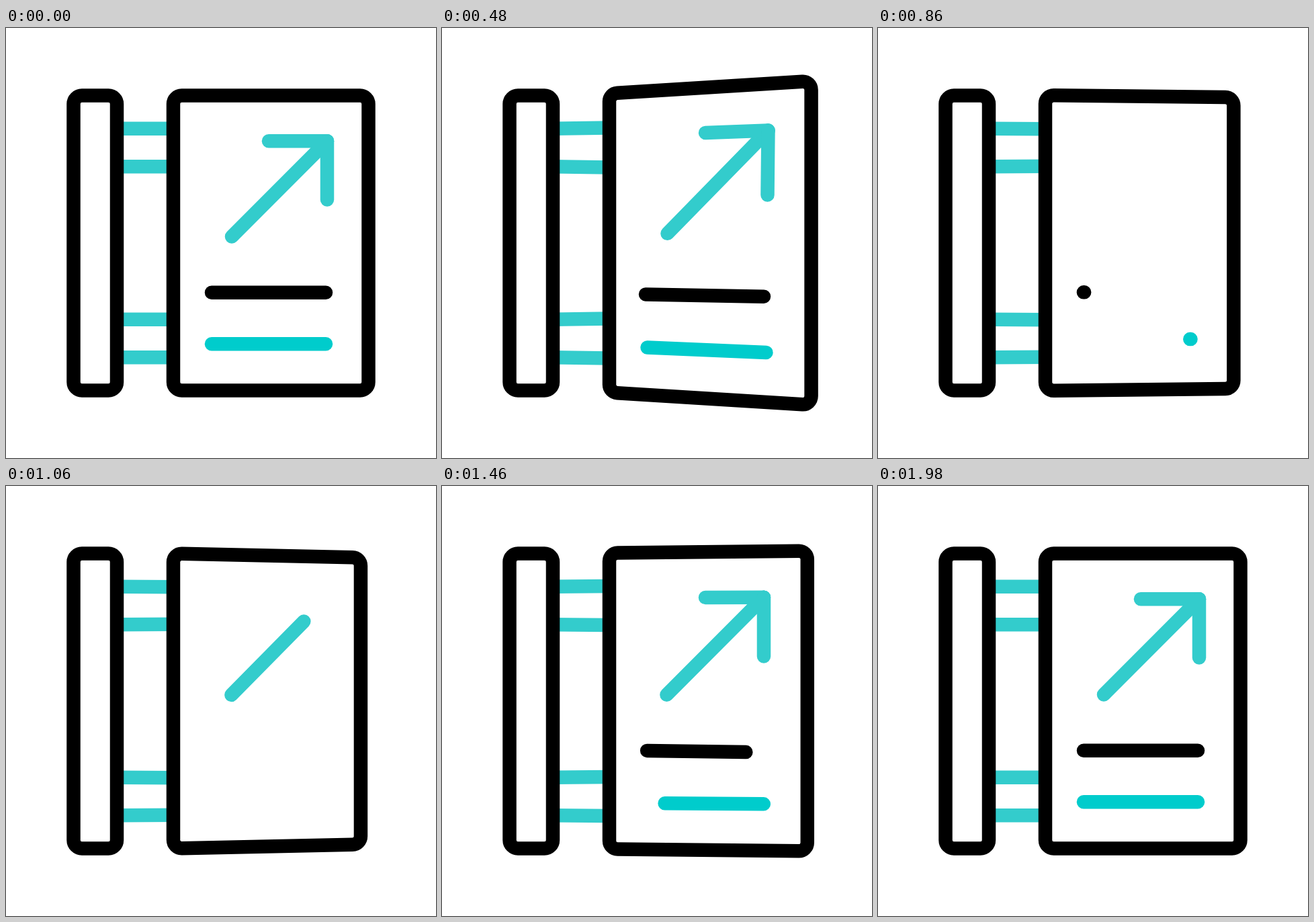
Write an HTML page with a canvas that moves like this. It is 640 px wide and 640 px high and loops after 2580 ms.

```html
<!DOCTYPE html>
<html lang="en">
<head>
<meta charset="utf-8">
<title>Swinging sign</title>
<style>
html, body { margin: 0; width: 100%; height: 100%; overflow: hidden; background: #fff; }
canvas { display: block; width: 100vmin; height: 100vmin; }
</style>
</head>
<body>
<canvas id="stage" width="640" height="640"></canvas>
<script>
const ctx = document.getElementById('stage').getContext('2d');
const LOOP = 2580, STEP = 20;
const BLACK = '#000', TEAL = '#33cccc', CYAN = '#00cccc';

// board: right x, left top y, right top y; skew: tilt of the bars
// arrow: tail, tip, left barb, lower barb; upper and lower: ends of the text lines
const rest = {
  board: [539.5, 100.5, 100.5], skew: [0],
  arrow: [336, 310.5, 478, 168.2, 391, 168.2, 478, 255.5],
  upper: [306, 393.7, 476, 393.7], lower: [306, 470.3, 476, 470.3]
};
const poses = [
  rest,
  { board: [549.6, 97.5, 78.8], skew: [1.2],
    arrow: [335.5, 305.8, 485.5, 152.5, 392, 156, 484.5, 248.5],
    upper: [303, 396.5, 479, 399.7], lower: [305.5, 475.5, 482.5, 483] },
  { board: [525.2, 100.7, 108.2], skew: [-0.7],
    arrow: [335.5, 311, 470, 174.5, 388, 175, 470, 262],
    upper: [306.5, 392.7, 470, 390], lower: [306, 464, 462, 459] },
  { board: [549, 99.3, 93.3], skew: [1.2],
    arrow: [334.5, 310.5, 481.3, 162.5, 393, 162.8, 481.3, 251],
    upper: [305, 394.2, 480, 398], lower: [306, 474, 482, 477] },
  { board: [535.5, 100.1, 101.6], skew: [0],
    arrow: [334.3, 311, 475.3, 171, 390.3, 171, 475.3, 257.3],
    upper: [305.3, 393.5, 473.7, 394], lower: [307, 469, 473.7, 467.5] },
  rest
];
const keys = [0, 495, 990, 1320, 1650, 1980];

const mix = (a, b, u) => a + (b - a) * u;
function ease(t, start, end) {
  const u = Math.min(1, Math.max(0, (t - start) / (end - start)));
  return u * u * (3 - 2 * u);
}

function poseAt(t) {
  let i = 0;
  while (i < keys.length - 2 && t >= keys[i + 1]) i++;
  const u = ease(t, keys[i], keys[i + 1]), pose = {};
  for (const part in rest)
    pose[part] = poses[i][part].map((v, n) => mix(v, poses[i + 1][part][n], u));
  return pose;
}

// Strokes the first part of the way from (x1, y1) to (x2, y2)
function line(x1, y1, x2, y2, color, part = 1, cap = 'round') {
  if (part <= 0) return;
  ctx.strokeStyle = color;
  ctx.lineCap = cap;
  ctx.beginPath();
  ctx.moveTo(x1, y1);
  ctx.lineTo(mix(x1, x2, part), mix(y1, y2, part));
  ctx.stroke();
}

// Rounded panel, mirrored about the horizontal middle of the stage
function panel(left, right, yl, yr) {
  const points = [[left, yl], [right, yr], [right, 640 - yr], [left, 640 - yl]];
  ctx.beginPath();
  ctx.moveTo(left, 320);
  points.forEach((p, i) => ctx.arcTo(...p, ...points[(i + 1) % 4], 12.5));
  ctx.closePath();
}

function drawArrow(t, [ax, ay, bx, by, cx, cy, dx, dy]) {
  const leaving = t < 885;
  const shaft = leaving ? 1 : ease(t, 890, 1130);
  const barbs = leaving ? 1 : ease(t, 1120, 1325);
  if (leaving) {
    const out = ease(t, 495, 885);
    ctx.translate(250 * out, -241 * out);
  }
  line(ax, ay, bx, by, TEAL, shaft);
  line(bx, by, cx, cy, TEAL, barbs);
  line(bx, by, dx, dy, TEAL, barbs);
}

function draw(t) {
  const { board, skew: [skew], arrow, upper, lower } = poseAt(t);
  const [right, yl, yr] = board;
  ctx.fillStyle = '#fff';
  ctx.fillRect(0, 0, 640, 640);
  ctx.lineWidth = 20.5;

  [149.8, 206.2, 433.8, 490.2].forEach((y, i) =>
    line(165, y, 249, y + (i % 2 ? skew : -skew), TEAL, 1, 'butt'));

  ctx.strokeStyle = BLACK;
  panel(100.5, 165, 100.5, 100.5);
  ctx.stroke();

  ctx.save();
  panel(249, right, yl, yr);
  ctx.fill();
  ctx.clip();
  drawArrow(t, arrow);
  ctx.restore();

  const length = t < 885 ? 1 - ease(t, 490, 880) : ease(t, 1145, 1560);
  const [ux, uy, vx, vy] = upper, [lx, ly, mx, my] = lower;
  line(ux, uy, vx, vy, BLACK, length);
  line(mx, my, lx, ly, CYAN, length);

  ctx.strokeStyle = BLACK;
  panel(249, right, yl, yr);
  ctx.stroke();
}

const begin = performance.now();
function tick() {
  const t = (performance.now() - begin) % LOOP;
  draw(Math.floor(t / STEP) * STEP);
  requestAnimationFrame(tick);
}
tick();
</script>
</body>
</html>
```
